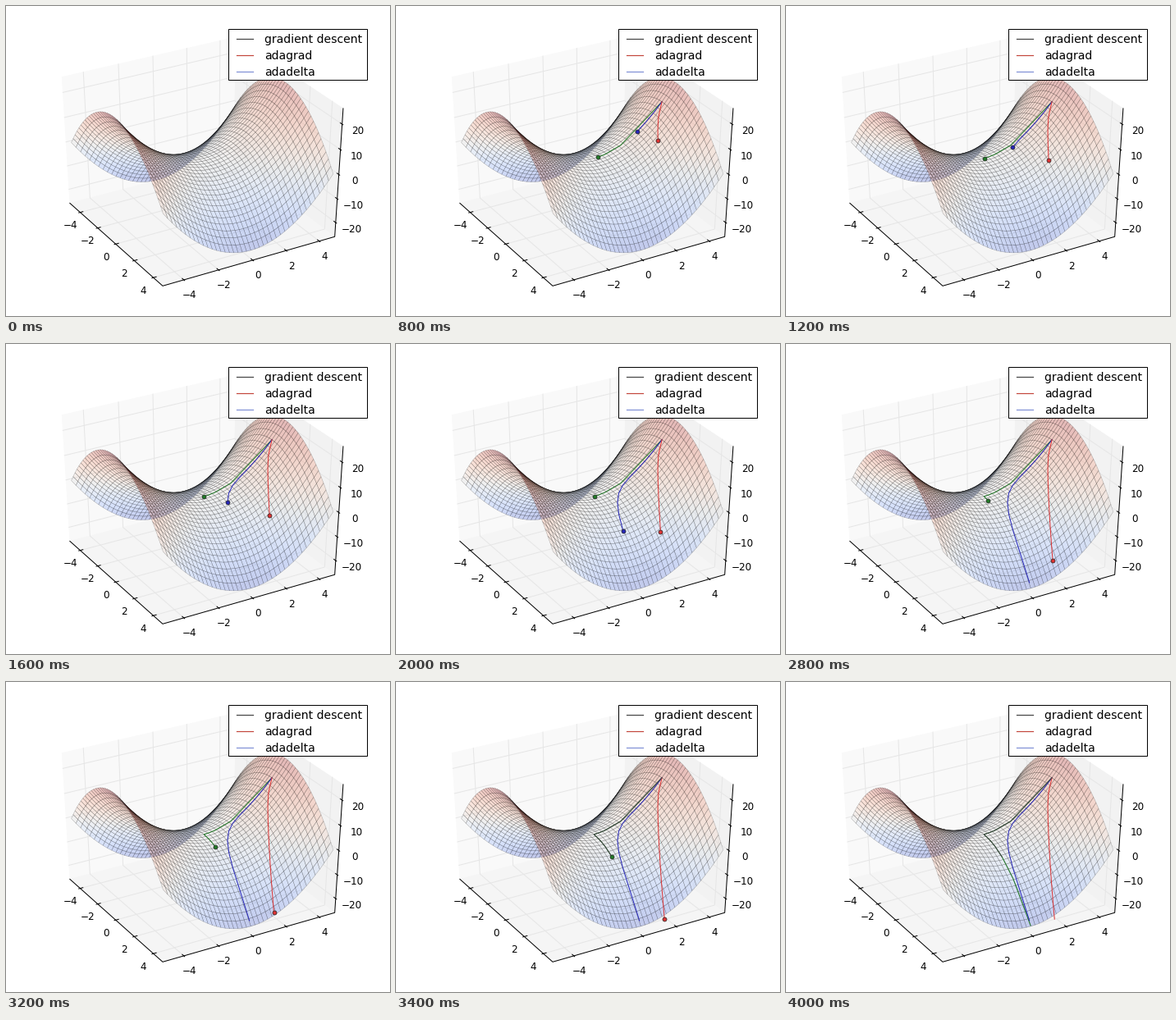
Animation, 468 px wide and 378 px high, one loop 4.2 s. Source, as a matplotlib script:

```python
import numpy as np
import matplotlib.pyplot as plt
from matplotlib.animation import FuncAnimation
from matplotlib.collections import PolyCollection
from matplotlib.patches import Rectangle

W, H, DPI = 468, 378, 72
FRAMES, STEP_MS = 21, 200
ELEV, AZIM, DIST = np.radians(35), np.radians(-30), 10
GRID = np.arange(-5, 5, 0.25)
LOW, HIGH = GRID[0], GRID[-1]
EDGE = 0.5 * (1 + 1 / 24)  # the panes reach a little past the data limits

plt.rcParams["font.family"] = "DejaVu Sans"
fig = plt.figure(figsize=(W / DPI, H / DPI), dpi=DPI, facecolor="white")
ax = fig.add_axes([0, 0, 1, 1])
ax.set(xlim=(0, W), ylim=(H, 0))
ax.axis("off")


def depth(p):
    """Distance towards the viewer of points in the unit cube."""
    ce, se = np.cos(ELEV), np.sin(ELEV)
    return p @ np.array([np.cos(AZIM) * ce, np.sin(AZIM) * ce, se])


def project(p):
    """Perspective projection from the centred unit cube to pixels."""
    p = np.asarray(p, float)
    ca, sa, ce, se = np.cos(AZIM), np.sin(AZIM), np.cos(ELEV), np.sin(ELEV)
    right = p @ np.array([-sa, ca, 0])
    up = p @ np.array([-ca * se, -sa * se, ce])
    scale = DIST / (DIST - depth(p))
    return np.stack([236.8 + 233.6 * right * scale,
                     185.3 - 181.6 * up * scale], axis=-1)


def unit(value):
    return (value - LOW) / (HIGH - LOW) - 0.5


def on_saddle(x, y):
    """Unit-cube points of the surface z = y^2 - x^2, with z in -25..25."""
    return np.stack([unit(x), unit(y), (y**2 - x**2) / 50], axis=-1)


def line3d(*points, **style):
    ax.plot(*project(points).T, **style)


def draw_box():
    e = EDGE
    panes = [
        ([(-e, -e, -e), (-e, e, -e), (-e, e, e), (-e, -e, e)], 0.975),
        ([(-e, e, -e), (e, e, -e), (e, e, e), (-e, e, e)], 0.95),
        ([(-e, -e, -e), (e, -e, -e), (e, e, -e), (-e, e, -e)], 0.9625),
    ]
    for corners, grey in panes:
        ax.fill(*project(corners).T, color=str(grey), lw=0.5, zorder=0)

    grid = dict(color="0.9", lw=1, zorder=1)
    axis = dict(color="black", lw=1, zorder=2)
    inner, outer = EDGE - 0.2 / 12, EDGE + 0.1 / 12

    def label(point, dx, dy, value):
        x, y = project(point)
        ax.text(x + dx, y + dy, f"{value}".replace("-", "\u2212"),
                size=12, ha="center", va="center", zorder=2)

    for value in range(-4, 5, 2):
        t = unit(value)
        line3d((t, -e, -e), (t, e, -e), (t, e, e), **grid)
        line3d((e, t, -e), (-e, t, -e), (-e, t, e), **grid)
        line3d((t, -inner, -e), (t, -outer, -e), **axis)
        line3d((inner, t, -e), (outer, t, -e), **axis)
        label((t, -e, -e), -12, 16.3, value)
        label((e, t, -e), 6.5, 18.8, value)
    for value in range(-20, 21, 10):
        t = value / 50
        line3d((-e, -e, t), (-e, e, t), (e, e, t), **grid)
        line3d((inner, e, t), (outer, e, t), **axis)
        label((e, e, t), 19.5, 8, value)
    line3d((-e, -e, -e), (e, -e, -e), (e, e, -e), (e, e, e), **axis)


def draw_saddle():
    p = on_saddle(*np.meshgrid(GRID, GRID))
    quads = np.stack([p[:-1, :-1], p[:-1, 1:], p[1:, 1:], p[1:, :-1]], axis=2)
    quads = quads.reshape(-1, 4, 3)
    centres = quads.mean(axis=1)
    order = np.argsort(depth(centres))
    faces = plt.get_cmap("coolwarm")(centres[order, 2] + 0.5)
    faces[:, 3] = 0.3
    ax.add_collection(PolyCollection(project(quads[order]), facecolors=faces,
                                     edgecolors=(0, 0, 0, 0.3),
                                     linewidths=0.45, zorder=3))


def draw_legend():
    ax.add_patch(Rectangle((270.5, 27.5), 169, 62, fc="white", ec="black",
                           lw=1, zorder=8))
    entries = [("gradient descent", "#444444"), ("adagrad", "#c4463c"),
               ("adadelta", "#7f8fd6")]
    for i, (name, color) in enumerate(entries):
        y = 39.5 + 20.3 * i
        ax.plot([280.5, 301], [y, y], color=color, lw=1.2, zorder=9)
        ax.text(315, y + 5, name, size=14, va="baseline", zorder=9)


def gradient(p):
    return 2 * p * np.array([-1, 1])


def gradient_descent(rate=0.3):
    return lambda g: rate * g


def adagrad(rate=0.5):
    total = np.zeros(2)

    def move(g):
        total[:] += g**2
        return rate * g / np.sqrt(total)
    return move


def adadelta(rho=0.5, eps=0.1):
    mean_g, mean_d = np.zeros(2), np.zeros(2)

    def move(g):
        mean_g[:] = rho * mean_g + (1 - rho) * g**2
        d = g * np.sqrt((mean_d + eps) / (mean_g + eps))
        mean_d[:] = rho * mean_d + (1 - rho) * d**2
        return d
    return move


def descend(move):
    """Screen path from a point near the ridge until it leaves the domain."""
    p, path = np.array([0.001, 4.0]), []
    while abs(p[0]) < 5 and len(path) < FRAMES:
        path.append(p)
        p = p - move(gradient(p))
    return project(on_saddle(*np.array(path).T))


def make_tracker(move, color):
    trail, = ax.plot([], [], color=color, lw=1, zorder=5)
    marker, = ax.plot([], [], "o", ms=5, mfc=color, mec="#222222", mew=0.7,
                      zorder=6)
    return descend(move), trail, marker


draw_box()
draw_saddle()
draw_legend()
trackers = [make_tracker(gradient_descent(), "#237a28"),
            make_tracker(adadelta(), "#2626b8"),
            make_tracker(adagrad(), "#dc3434")]

FADE_STEP = 17  # the descent trail so far turns grey here
faded, = ax.plot([], [], color="#454548", lw=1, zorder=5.5)


def update(step):
    for path, trail, marker in trackers:
        trail.set_data(*path[:step].T)
        shown = 0 < step <= len(path)
        marker.set_data(*path[step - 1:step].T if shown else ([], []))
    past = trackers[0][0][:FADE_STEP if step >= FADE_STEP else 0]
    faded.set_data(*past.T)
    return []


anim = FuncAnimation(fig, update, frames=FRAMES, interval=STEP_MS,
                     init_func=lambda: update(0), repeat=True, repeat_delay=0)
plt.show()
```
